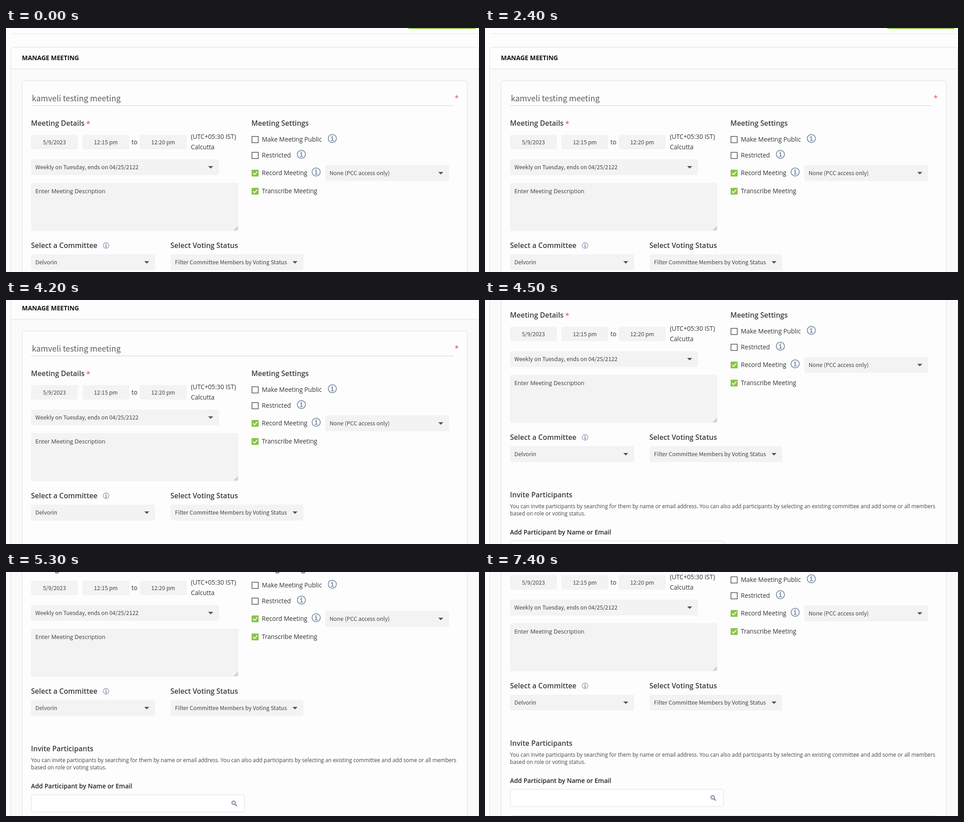
Animation of 1040 by 539 pixels, one loop 8000 ms. Source, as an HTML page:

```html
<!DOCTYPE html>
<html lang="en">
<head>
<meta charset="utf-8">
<title>Manage meeting</title>
<style>
html, body { margin: 0; width: 100%; height: 100%; overflow: hidden; background: #fdfdfd; }
svg { display: block; width: 100%; height: 100%; }
text { font-family: "Open Sans", "Noto Sans", sans-serif; fill: #3c3c3c; white-space: pre; }
.label { font-size: 13.7px; fill: #333; }
.head { font-size: 15.65px; font-weight: 600; }
.caps { font-size: 13.7px; font-weight: 700; fill: #111; }
.sub { font-size: 13.7px; font-weight: 600; fill: #222; }
.note { font-size: 11.75px; fill: #444; }
.hint { font-size: 12.7px; }
.input, .title { font-family: "Noto Sans CJK SC", "Noto Sans CJK JP", "Noto Sans CJK", "Noto Sans", sans-serif; }
.input { font-size: 12.27px; fill: #444; }
.title { font-size: 17.5px; font-weight: 300; fill: #5c5c5c; }
.star { font-size: 16px; fill: #e8483f; }
.mid { text-anchor: middle; }
</style>
</head>
<body>
<svg id="stage" viewBox="0 0 1040 539" preserveAspectRatio="none">
  <g id="page"></g>
  <path id="cursor" d="M.5 .5V16.2L4.2 12.7L6.8 18.6L9 17.6L6.4 11.8H11.4Z" fill="#fff" stroke="#222" stroke-width="1"/>
</svg>
<script>
const LOOP = 8000, STEP = 100;
const page = document.getElementById('page');
const cursor = document.getElementById('cursor');

const text = (x, y, cls, str) => `<text x="${x}" y="${y}" class="${cls}">${str}</text>`;
const rect = (x, y, w, h, fill, r = 0, stroke = 'none') =>
  `<rect x="${x}" y="${y}" width="${w}" height="${h}" rx="${r}" fill="${fill}" stroke="${stroke}"/>`;
const line = (d, color, w = 1) => `<path d="${d}" fill="none" stroke="${color}" stroke-width="${w}"/>`;

const field = (x, str) => rect(x, 236, 103, 32, '#f3f3f3', 4) + text(x + 51.5, 257, 'input mid', str);

const select = (x, y, w, str) => rect(x, y, w, 35, '#f3f3f3', 4) +
  text(x + 9.5, y + 22, 'input', str) +
  `<path d="M${x + w - 24} ${y + 15}h11l-5.5 5.5z" fill="#555"/>`;

const check = (y, on, str) => (on
  ? rect(540, y - 7, 15.5, 15, '#8bc34a', 1) + line(`M543 ${y + .5}l3.4 3.4l6.4 -7`, '#fff', 1.7)
  : `<rect x="540.8" y="${y - 6.4}" width="13.8" height="13.8" fill="#fff" stroke="#555" stroke-width="1.5"/>`) +
  text(562.5, y + 5, 'label', str);

const info = (x, y, r) => {
  const k = r / 9;
  return `<g transform="translate(${x} ${y}) scale(${k})" stroke="#7c8ba8" fill="none">` +
    `<circle r="8.5" stroke-width="${k < 1 ? 1.5 : 1.7}"/>` +
    '<path d="M-2.6 -1.6H.3V4.4M-2.8 4.4H3" stroke-width="1.8"/><circle cy="-4.5" r="1" fill="#7c8ba8" stroke-width=".6"/></g>';
};

page.innerHTML = [
  rect(883, -34, 151, 36, '#8bc34a', 4),
  line('M14 12.5H1036', '#e6e6e6'),
  rect(10.5, 42.5, 1029, 900, '#fdfdfd', 5, '#dedede'),
  rect(11, 91, 1028, 850, '#fafafa'),
  line('M11 90.5H1039', '#dedede'),
  text(35, 71, 'caps', 'MANAGE MEETING'),
  rect(35.5, 116.5, 979, 820, '#fdfdfd', 5, '#dedede'),

  text(57, 161.5, 'title', 'kamveli testing meeting'),
  line('M55 171.5H984', '#d4d4d4'),
  text(986.5, 160, 'star', '*'),

  text(55, 215.5, 'head', 'Meeting Details'),
  text(176.5, 217, 'star', '*'),
  field(55, '5/9/2023'),
  field(168, '12:15 pm'),
  text(276, 257, 'label', 'to'),
  field(294, '12:20 pm'),
  text(406.5, 245, 'label', '(UTC+05:30 IST)'),
  text(406.5, 268, 'label', 'Calcutta'),
  select(55, 290, 413.5, 'Weekly on Tuesday, ends on 04/25/2122'),
  rect(55, 342, 456, 106.5, '#f3f3f3', 4),
  text(64.5, 364.5, 'hint', 'Enter Meeting Description'),
  line('M502 447L510 439M506.5 447L510 443.5', '#666'),

  text(539.5, 215.5, 'head', 'Meeting Settings'),
  check(246, false, 'Make Meeting Public'), info(717.5, 244, 9.5),
  check(281, false, 'Restricted'), info(649.5, 279, 9.5),
  check(320, true, 'Record Meeting'), info(682, 318, 9.5),
  check(360, true, 'Transcribe Meeting'),
  select(702, 303, 272.5, 'None (PCC access only)'),

  text(55, 485.5, 'head', 'Select a Committee'), info(220, 480.5, 6.7),
  select(55, 500, 273, 'Delvorin'),
  text(361.5, 485.5, 'head', 'Select Voting Status'),
  select(362, 500, 292, 'Filter Committee Members by Voting Status'),

  text(55, 612.5, 'head', 'Invite Participants'),
  text(55, 637, 'note', 'You can invite participants by searching for them by name or email address. You can also add participants by selecting an existing committee and add some or all members'),
  text(55, 652.5, 'note', 'based on role or voting status.'),
  text(55, 694.5, 'sub', 'Add Participant by Name or Email'),
  rect(55.5, 709, 469, 38, '#fff', 4, '#dcdfe6'),
  '<circle cx="500.5" cy="726.8" r="3.8" fill="none" stroke="#7384a3" stroke-width="2"/>',
  line('M503.3 729.6L507.5 733.8', '#7384a3', 2.4),
  rect(55.5, 767.5, 938, 160, '#fdfdfd', 5, '#dcdfe6')
].join('');

// Scroll comes in three flicks: [time, offset].
const scroll = [[0, 0], [4200, 48], [4300, 137], [4500, 177], [4600, 191], [4700, 200.5], [5300, 217], [5400, 229]];

// The pointer hides over text: [appears, hides, one point per step, the last one held].
const runs = [
  [200, 1200, [[152, 48], [176, 36], [190, 31], [187, 58], [165, 90], [128, 118], [88, 138], [64, 144], [70, 142], [75, 142]]],
  [1400, 1600, [[40, 152], [31, 174]]],
  [1700, 2400, [[150, 270], [240, 285], [277, 287], [225, 274], [165, 272], [119, 254], [63, 254]]],
  [3100, 3400, [[913, 234], [959, 234]]],
  [6000, 6200, [[191, 106], [170, 83]]],
  [6400, 6600, [[164, 83], [154, 97]]],
  [6700, 7400, [[270, 236], [390, 330], [530, 356], [715, 338], [880, 288], [968, 246]]]
];

function draw(ms) {
  const t = Math.floor(ms % LOOP / STEP) * STEP;
  const offset = scroll.filter(s => s[0] <= t).pop()[1];
  page.setAttribute('transform', `translate(0 ${-offset})`);

  const run = runs.find(([from, to]) => t >= from && t < to);
  cursor.setAttribute('visibility', run ? 'visible' : 'hidden');
  if (run) {
    const [from, , pts] = run;
    const [x, y] = pts[Math.min((t - from) / STEP, pts.length - 1)];
    cursor.setAttribute('transform', `translate(${x} ${y})`);
  }
}

const start = performance.now();
function tick() {
  draw(performance.now() - start);
  requestAnimationFrame(tick);
}
tick();
</script>
</body>
</html>
```
